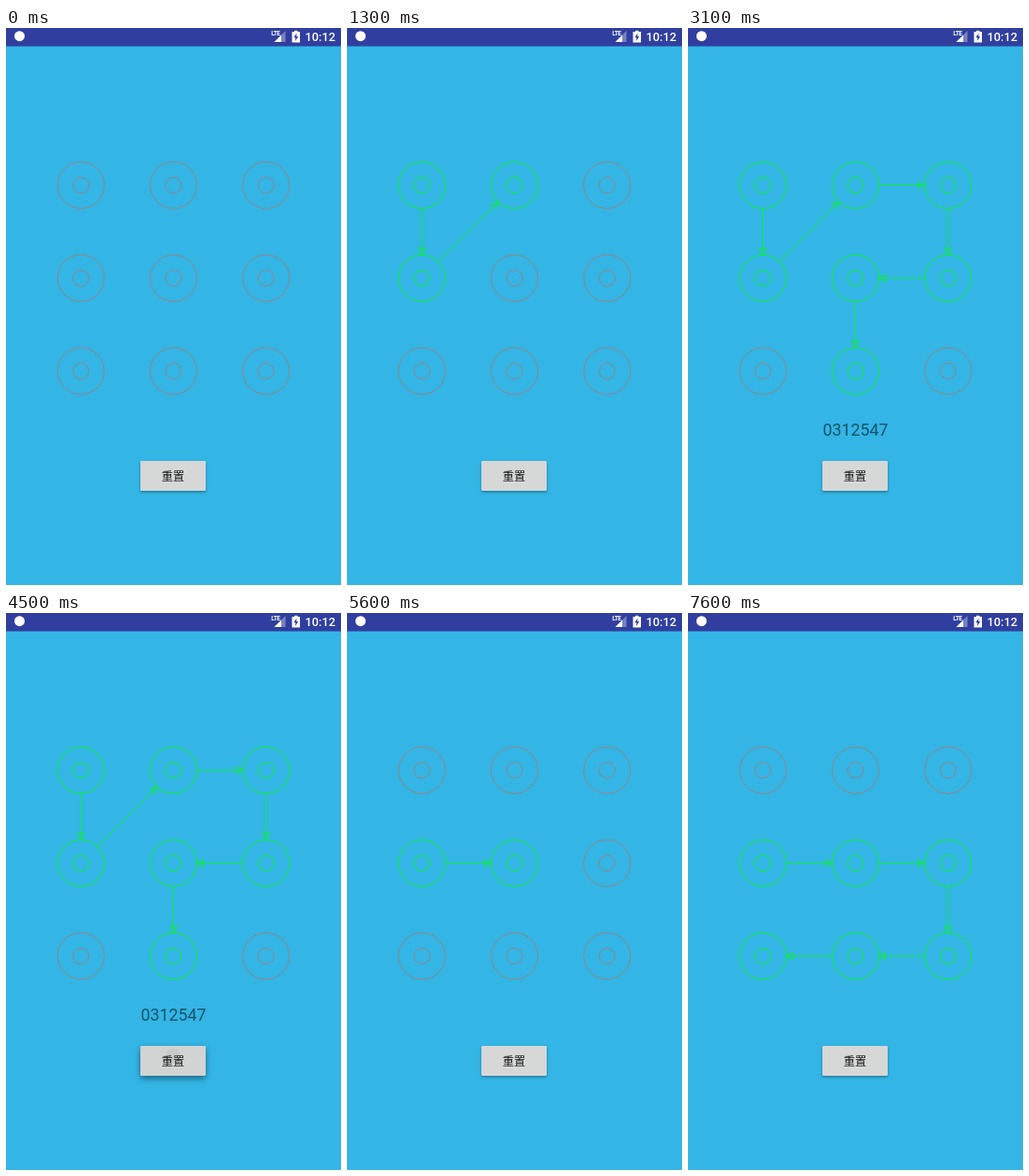
Write an HTML page with a canvas that moves like this. It is 359 px wide and 597 px high and loops after 8000 ms.

```html
<!DOCTYPE html>
<html lang="zh">
<head>
<meta charset="utf-8">
<title>Pattern lock</title>
<style>
  html, body { margin: 0; width: 100%; height: 100%; overflow: hidden; background: #33b5e5; }
  canvas { display: block; width: 359px; height: 597px; }
</style>
</head>
<body>
<canvas id="stage"></canvas>
<script>
const W = 359, H = 597, LOOP = 8000;
const OUTER = 25, INNER = 8.5;
const IDLE = '#a07f76', GREEN = '#00ff00';
const canvas = document.getElementById('stage');
const ctx = canvas.getContext('2d');
const ratio = window.devicePixelRatio || 1;
canvas.width = W * ratio;
canvas.height = H * ratio;

// Time, visited nodes, and the finger position while it is between nodes.
const steps = [
  [0, ''], [600, '0'],
  [800, '0', 80, 224], [900, '03'], [1000, '03', 80, 301],
  [1100, '03', 113, 234], [1200, '03', 142, 205], [1300, '031'],
  [1600, '0312'],
  [2000, '0312', 279, 222], [2100, '03125'],
  [2200, '03125', 238, 268], [2300, '03125', 216, 268], [2400, '031254'],
  [2600, '031254', 179, 322], [2700, '0312547'],
  [4600, ''], [5300, '3'],
  [5500, '3', 130, 268], [5600, '34'],
  [5800, '34', 214, 268], [5900, '34', 229, 268], [6000, '34', 244, 268], [6100, '345'],
  [6400, '345', 279, 309], [6500, '345', 279, 328], [6600, '3458'],
  [7000, '34587'],
  [7500, '34587', 126, 368], [7600, '345876']
];

const node = i => ({ x: 80.3 + (i % 3) * 99.2, y: 168.5 + Math.floor(i / 3) * 99.6 });

function disc(x, y, r, color) {
  ctx.fillStyle = color;
  ctx.beginPath();
  ctx.arc(x, y, r, 0, Math.PI * 2);
  ctx.fill();
}

function ring(x, y, r) {
  ctx.beginPath();
  ctx.arc(x, y, r, 0, Math.PI * 2);
  ctx.stroke();
}

function poly(points, color) {
  ctx.fillStyle = color;
  ctx.beginPath();
  points.forEach(p => ctx.lineTo(p[0], p[1]));
  ctx.fill();
}

function label(text, x, y, font, color, align = 'center') {
  ctx.font = font;
  ctx.fillStyle = color;
  ctx.textAlign = align;
  ctx.fillText(text, x, y);
}

function statusBar() {
  ctx.fillStyle = '#303f9f';
  ctx.fillRect(0, 0, W, 19.6);
  disc(14.5, 8.7, 5.5, '#fff');
  ctx.letterSpacing = '-0.4px';
  label('LTE', 284.2, 8.2, 'bold 6.5px Roboto, sans-serif', '#fff', 'left');
  ctx.letterSpacing = '0px';
  poly([[287.5, 15], [299.5, 15], [299.5, 3]], 'rgba(255,255,255,.35)');
  poly([[287.5, 15], [295, 15], [295, 7.5]], '#fff');
  ctx.fillStyle = '#fff';
  ctx.fillRect(306.5, 4, 8.5, 11.5);
  ctx.fillRect(309, 2.8, 3.5, 1.5);
  poly([[311.5, 5.5], [308.3, 10.3], [310.3, 10.3], [310, 14], [313.2, 9], [311.2, 9]], '#303f9f');
  label('10:12', 353, 14, '500 12.8px Roboto, sans-serif', '#fff', 'right');
}

function drawNode(i, active) {
  const { x, y } = node(i);
  ctx.strokeStyle = active ? GREEN : IDLE;
  ctx.lineWidth = active ? 0.8 : 0.9;
  ring(x, y, OUTER);
  ring(x, y, INNER);
}

// Joins the rims of two nodes, or one rim and the finger.
function link(from, to, arrow) {
  const dx = to.x - from.x, dy = to.y - from.y;
  const end = Math.hypot(dx, dy) - (arrow ? OUTER : 0);
  if (end <= OUTER) return;
  ctx.save();
  ctx.translate(from.x, from.y);
  ctx.rotate(Math.atan2(dy, dx));
  ctx.strokeStyle = GREEN;
  ctx.lineWidth = 0.75;
  ctx.beginPath();
  ctx.moveTo(OUTER, 0);
  ctx.lineTo(end, 0);
  if (arrow) {
    ctx.moveTo(end, 0);
    ctx.lineTo(end - 7, -4);
    ctx.lineTo(end - 7, 4);
    ctx.closePath();
  }
  ctx.stroke();
  ctx.restore();
}

function button(t) {
  const pressed = t >= 4500 && t < 4700;
  ctx.save();
  ctx.shadowColor = pressed ? 'rgba(0,0,0,.42)' : 'rgba(0,0,0,.34)';
  ctx.shadowBlur = (pressed ? 6 : 3) * ratio;
  ctx.shadowOffsetY = (pressed ? 3 : 1.5) * ratio;
  ctx.fillStyle = pressed ? '#d2d3d3' : '#d6d7d7';
  ctx.beginPath();
  ctx.roundRect(144, 464, 70, 32, 1.2);
  ctx.fill();
  ctx.restore();
  if (pressed) disc(179, 475, t < 4600 ? 8 : 10.5, '#c8c9c9');
  label('重置', 179, 484.5, '12.2px "Noto Sans CJK SC", "Noto Sans CJK", sans-serif', '#151515');
}

function draw(t) {
  const [, path, fx, fy] = steps.filter(s => s[0] <= t).pop();
  ctx.setTransform(ratio, 0, 0, ratio, 0, 0);
  ctx.fillStyle = '#33b5e5';
  ctx.fillRect(0, 0, W, H);
  statusBar();
  for (let i = 0; i < 9; i++) drawNode(i, path.includes(i));
  for (let i = 1; i < path.length; i++) link(node(path[i - 1]), node(path[i]), true);
  if (fx) link(node(path[path.length - 1]), { x: fx, y: fy }, false);
  if (t >= 3100 && t < 4600) {
    label(path, 179.4, 436.5, '17.8px Roboto, sans-serif', 'rgba(0,0,0,.54)');
  }
  button(t);
}

const start = performance.now();
function tick() {
  draw((performance.now() - start) % LOOP);
  requestAnimationFrame(tick);
}
tick();
</script>
</body>
</html>
```
